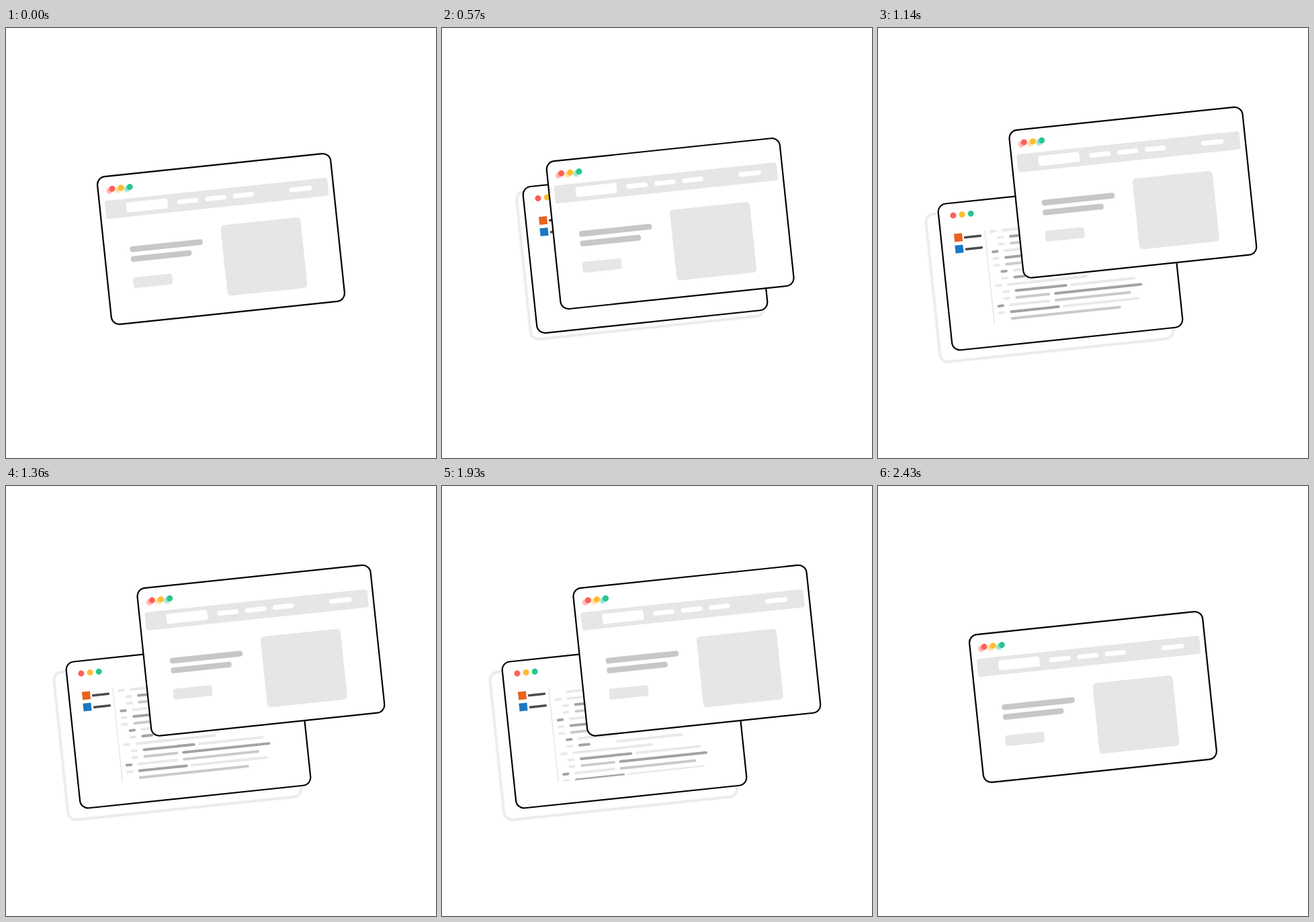
An HTML page for the animation above (3.21 s loop, 640 by 640 pixels).

```html
<!DOCTYPE html>
<html lang="en">
<head>
<meta charset="utf-8">
<title>Web page and code windows</title>
<style>
  html, body { margin: 0; width: 100%; height: 100%; overflow: hidden; background: #fff; }
  svg { display: block; width: 100%; height: 100%; }
  .frame { fill: #fff; stroke: #000; stroke-width: 2.2; }
  .shadow { fill: none; stroke: #000; stroke-width: 2.8; opacity: .11; filter: blur(1px); }
  .glow { opacity: .5; filter: blur(1.1px); }
  .panel { fill: #e6e6e6; }
  .blank { fill: #fff; }
  .heading { fill: #c7c7c7; }
  .label { fill: #4a4a4a; }
  .dark { fill: #a3a3a3; }
  .mid { fill: #cacaca; }
  .light { fill: #e9e9e9; }
</style>
</head>
<body>
<svg viewBox="0 0 640 640">
  <defs>
    <g id="dots">
      <circle r="4.5" fill="#ff5f57"/>
      <circle r="4.5" cx="13.2" fill="#febc2e"/>
      <circle r="4.5" cx="26.4" fill="#26c690"/>
    </g>
    <clipPath id="editor"><rect x="-110" y="-64.5" width="270" height="140.7"/></clipPath>
  </defs>

  <g id="shadow"><rect class="shadow" x="-174.5" y="-110.5" width="349" height="221" rx="12"/></g>

  <g id="back">
    <rect class="frame" x="-172.5" y="-109.7" width="345" height="219" rx="12"/>
    <use href="#dots" x="-150.9" y="-91.1"/>
    <rect x="-152.8" y="-63.5" width="12" height="12" fill="#ea6220"/>
    <rect x="-153.1" y="-46.4" width="12" height="12" fill="#1b78c4"/>
    <rect class="label" x="-138.5" y="-58.4" width="26.5" height="3.4" rx="1.7"/>
    <rect class="label" x="-138.4" y="-40.8" width="26.5" height="3.4" rx="1.7"/>
    <rect class="panel" x="-107.4" y="-64.5" width="1.5" height="140"/>
    <g clip-path="url(#editor)"><g id="code"></g></g>
  </g>

  <g id="front">
    <rect class="frame" x="-174.5" y="-110.5" width="349" height="221" rx="12"/>
    <use class="glow" href="#dots" x="-157.6" y="-88.8"/>
    <use href="#dots" x="-153.3" y="-91.3"/>
    <rect class="panel" x="-166.5" y="-74.3" width="333" height="27" rx="4"/>
    <rect class="blank" x="-135" y="-68.7" width="61.5" height="15" rx="3.5"/>
    <rect class="blank" x="-58.8" y="-64.9" width="31.6" height="7" rx="3.3"/>
    <rect class="blank" x="-17.2" y="-64.9" width="31.6" height="7" rx="3.3"/>
    <rect class="blank" x="24.3" y="-64.9" width="31.6" height="7" rx="3.3"/>
    <rect class="blank" x="108.6" y="-65.2" width="33.7" height="7" rx="3.3"/>
    <rect class="heading" x="-136.5" y="-2.9" width="109" height="8.6" rx="4"/>
    <rect class="heading" x="-136.5" y="11.6" width="91" height="8.6" rx="4"/>
    <rect class="panel" x="-136.5" y="43.3" width="58.4" height="16.2" rx="4"/>
    <rect class="panel" x="1.1" y="-20.1" width="119.6" height="105.6" rx="5.5"/>
  </g>
</svg>
<script>
const LOOP = 3210, FPS = 14;
const byId = id => document.getElementById(id);

// Each line: indent, marker shade, then bars as [shade, width, x (optional)].
const LINES = [
  [1, 'light', ['mid', 60]],
  [0, '', ['light', 70]],
  [0, 'light', ['light', 70]],
  [1, 'light', ['dark', 60]],
  [1, 'light', ['mid', 60]],
  [0, 'dark', ['light', 70]],
  [0, 'light', ['dark', 70]],
  [0, 'light', ['mid', 70]],
  [1, 'dark', ['light', 60]],
  [1, 'light', ['dark', 18], ['light', 100, -15]],
  [0, 'light', ['light', 121]],
  [1, 'light', ['dark', 78.5], ['light', 98, 11.5]],
  [1, 'light', ['mid', 52], ['dark', 132, -13.7]],
  [0, 'dark', ['light', 61], ['mid', 114.5, -13.9]],
  [0, 'light', ['dark', 74.5], ['light', 115, -3]],
  [0, '', ['mid', 165]]
];

const bar = (shade, x, y, width) =>
  `<rect class="${shade}" x="${x}" y="${y - 2}" width="${width}" height="4" rx="2"/>`;

byId('code').innerHTML = LINES.map(([indent, marker, ...bars], i) => {
  const y = -61.5 + 10.15 * (i - 2), left = -81.7 + 10.2 * indent;
  return (marker ? bar(marker, left - 18, y, 10.5) : '') +
    bars.map(([shade, width, x = left]) => bar(shade, x, y, width)).join('');
}).join('');

// Bezier easing with control points (x1, 0) and (x2, 1).
function ease(x, x1, x2) {
  if (x <= 0) return 0;
  if (x >= 1) return 1;
  let low = 0, high = 1;
  for (let i = 0; i < 24; i++) {
    const s = (low + high) / 2, r = 1 - s;
    if (3 * x1 * s * r * r + 3 * x2 * s * s * r + s ** 3 < x) low = s;
    else high = s;
  }
  return low * low * (3 - 2 * low);
}

const span = (t, from, to) => (t - from) / (to - from);
const openness = (t, x2, from, to) =>
  ease(span(t, 394, 786), .42, x2) - ease(span(t, from, to), .42, .58);

function place(id, x, y) {
  byId(id).setAttribute('transform', `translate(${x} ${y}) rotate(-6)`);
}

function draw(t) {
  const lift = openness(t, .775, 1922, 2392);
  const spread = openness(t, .7, 1948, 2388);
  const x = 320 + 59.4 * lift, y = 314 - 69.2 * lift;
  const scroll = 20.9 * (Math.max(0, t - 1071) / 1000) ** 2;
  place('front', x, y);
  place('shadow', x - 124 * spread, y + 125 * spread);
  place('back', 320 - 48.5 * spread, 314 + 39.8 * spread);
  byId('code').setAttribute('transform', `translate(0 ${scroll})`);
}

// Holds each pose for one step of the frame rate, with steps aligned to 10 ms.
function poseTime(ms) {
  const tick = Math.floor((ms % LOOP) / 10);
  return Math.floor((tick + .5) * FPS / 100) * 1000 / FPS;
}

const start = performance.now();
function loop() {
  draw(poseTime(performance.now() - start));
  requestAnimationFrame(loop);
}
loop();
</script>
</body>
</html>
```
